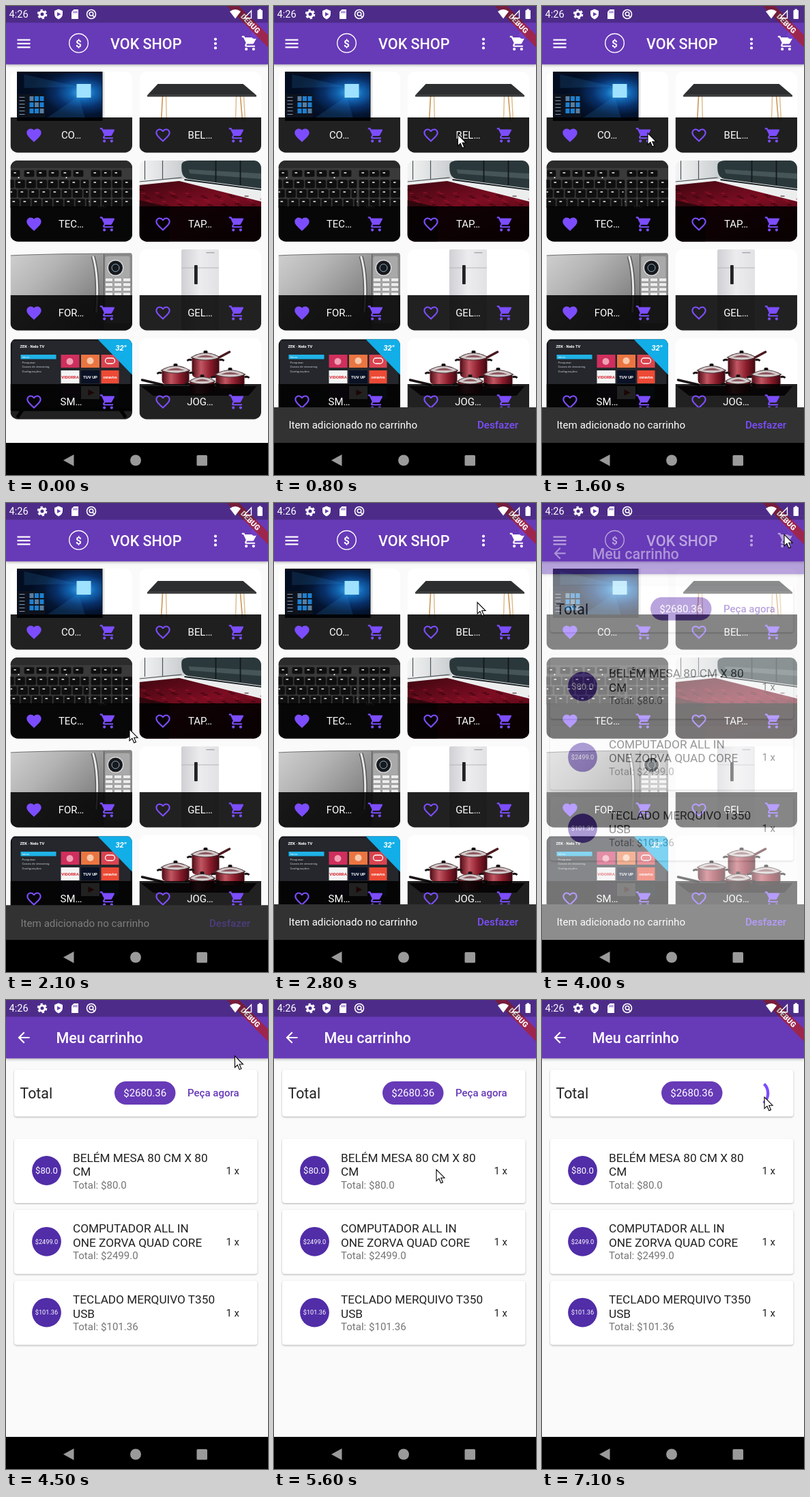
An HTML page for the animation above (7200 ms loop, 384 by 686 pixels).

```html
<!DOCTYPE html>
<html lang="pt">
<head>
<meta charset="utf-8">
<style>
  html, body { margin: 0; width: 100%; height: 100%; overflow: hidden; background: #fafafa; }
  svg { display: block; font-family: Roboto, sans-serif; }
  .bar { filter: drop-shadow(0 1.5px 2px rgba(0,0,0,.32)); }
  .card { filter: drop-shadow(0 1px 1.2px rgba(0,0,0,.3)); }
</style>
</head>
<body>
<svg id="stage" width="384" height="686" viewBox="0 0 384 686"></svg>
<script>
const PRIMARY = '#673ab7', ACCENT = '#7c4dff', INK = '#212121';
const LOOP = 7200;

const rect = (x, y, w, h, fill, r = 0, extra = '') =>
  `<rect x="${x}" y="${y}" width="${w}" height="${h}" fill="${fill}" rx="${r}" ${extra}/>`;
const circle = (x, y, r, fill, extra = '') => `<circle cx="${x}" cy="${y}" r="${r}" fill="${fill}" ${extra}/>`;
const path = (d, fill, extra = '') => `<path d="${d}" fill="${fill}" ${extra}/>`;
const line = (d, stroke, w = 1, extra = '') => path(d, 'none', `stroke="${stroke}" stroke-width="${w}" ${extra}`);
const text = (x, y, size, str, fill, extra = '') =>
  `<text x="${x}" y="${y}" font-size="${size}" fill="${fill}" ${extra}>${str}</text>`;
const group = (x, y, body, extra = '') => `<g transform="translate(${x} ${y})" ${extra}>${body}</g>`;
const repeat = (n, fn) => Array.from({ length: n }, (_, i) => fn(i)).join('');
const MID = ' text-anchor="middle" ', MEDIUM = ' font-weight="500" ', BOLD = ' font-weight="700" ';

// 24-unit icons, centred on x, y
const HEART = 'M12 21.35l-1.45-1.32C5.4 15.36 2 12.28 2 8.5 2 5.42 4.42 3 7.5 3c1.74 0 3.41.81 4.5 2.09C13.09 3.81 14.76 3 16.5 3 19.58 3 22 5.42 22 8.5c0 3.78-3.4 6.86-8.55 11.54z';
const HEART_HOLE = 'M12.1 18.55l-.1.1-.11-.1C7.14 14.24 4 11.39 4 8.5 4 6.5 5.5 5 7.5 5c1.54 0 3.04.99 3.57 2.36h1.87C13.46 5.99 14.96 5 16.5 5c2 0 3.5 1.5 3.5 3.5 0 2.89-3.14 5.74-7.9 10.05z';
const CART = 'M7 18a2 2 0 1 0 0 4 2 2 0 0 0 0-4zM1 2v2h2l3.6 7.59-1.35 2.45c-.16.28-.25.61-.25.96 0 1.1.9 2 2 2h12v-2H7.42c-.14 0-.25-.11-.25-.25l.03-.12.9-1.63h7.45c.75 0 1.41-.41 1.75-1.03l3.58-6.49c.08-.14.12-.31.12-.48 0-.55-.45-1-1-1H5.21l-.94-2zm16 16a2 2 0 1 0 0 4 2 2 0 0 0 0-4z';
const BACK = 'M20 11H7.83l5.59-5.59L12 4l-8 8 8 8 1.41-1.41L7.83 13H20z';
const icon = (x, y, d, fill) =>
  path(d, fill, `fill-rule="evenodd" transform="translate(${x - 12.8} ${y - 12.8}) scale(1.0667)"`);

const gradient = (id, stops, attrs = '', kind = 'linear') =>
  `<${kind}Gradient id="${id}" ${attrs}>${stops.map((c, i) =>
    `<stop offset="${i / (stops.length - 1)}" stop-color="${c}"/>`).join('')}</${kind}Gradient>`;

const defs = `<defs>
  <clipPath id="tile"><rect width="178.5" height="118.5" rx="10.7"/></clipPath>
  ${gradient('desktop', ['#3fb4f0', '#1263b0', '#08306a', '#041634', '#030d22'], 'cx=".77" cy=".42" r=".62"', 'radial')}
  ${gradient('steel', ['#cfcfcf', '#b4b4b4', '#8e8e8e', '#6c6c6c'], 'x2="1" y2=".6"')}
  ${gradient('fridge', ['#cfd0d4', '#ececee', '#e2e2e5'])}
  ${gradient('enamel', ['#4c0a14', '#c25662', '#8c1d2c', '#3e0810'])}
  ${gradient('rug', ['#3f0610', '#7d0d22', '#4a0713'], 'x2=".6" y2="1"')}
  ${gradient('room', ['#f4f4f4', '#c9cdcf'])}
</defs>`;

// Product pictures, in tile coordinates
const computer = () =>
  rect(9.5, 0, 128.5, 72, '#e4e6e8') + rect(9.5, 0, 125.5, 72, '#0a0e16') + rect(10.5, 1.5, 123.5, 70, 'url(#desktop)') +
  path('M100 22L20 4V24zM100 36L50 70H110z', '#3aa4ea', 'opacity=".14"') +
  rect(97, 18, 21, 20, '#9fe2ff') +
  rect(10.5, 33, 40, 34, '#0d131e') +
  repeat(9, i => rect(28 + i % 3 * 7.5, 36 + (i / 3 | 0) * 9, 6, 7, i % 4 ? '#1d7fd0' : '#5a7d9e')) +
  repeat(6, i => rect(13, 37 + i * 5, 8, 1, '#8793a3'));

const table = () =>
  rect(0, 68, 179, 51, '#eeeeee') +
  line('M34 36L32 72M148 36L151 72', '#d0a066', 1.8) +
  line('M39 36L40 72M142 36L141 72M153 36L155 72', '#dcb987', 1.4) +
  path('M27 18H152L171.5 34.5H11.5z', '#2d2e2f') + path('M11.5 34.5H171.5V36.5H11.5z', '#191a1a');

const key = (x, y, w, h) =>
  rect(x, y, w, h, '#0f0f0f', 2, 'stroke="#2a2a2a" stroke-width=".6"') +
  rect(x + 4, y + 3, w * .25, 2, '#b9b9b9');
const keyRow = (x, y, n, w, h, pitch) => repeat(n, i => key(x + i * pitch, y, w, h));
const keyboard = () =>
  rect(0, 0, 179, 119, '#3a3a3a') + rect(0, 0, 179, 11, '#2b2b2b') +
  keyRow(1, 14, 1, 13, 10, 0) + keyRow(20, 14, 5, 15, 10, 18) + keyRow(118, 14, 3, 14, 10, 15.5) +
  circle(12, 25, 1, '#fff') + circle(82, 25, 1, '#fff') +
  repeat(3, r => keyRow(-9 + r * 4, 28 + r * 14, 7, 14.5, 12.5, 16) +
    key(103 + r * 4, 28 + r * 14, 12 - r * 4, 12.5) + keyRow(118, 28 + r * 14, 4, 14, 12.5, 15.5)) +
  text(128, 69.5, 5, 'teclas', '#aaa');

const rug = () =>
  rect(0, 0, 179, 119, '#eceeee') + rect(0, 0, 66, 27, 'url(#room)') +
  line('M8 0V28M34 0V27M0 31L62 25', '#4d5356', 1.2) +
  path('M62 5Q64 0 74 0H179V41L72 27Q60 25 62 5z', '#2b383b') +
  path('M72 13L179 19V27L74 19z', '#465557') +
  line('M112 0V32M148 0V36M66 28L179 43', '#11181b', 1.8) +
  path('M0 36L58 30L179 60V119H0z', 'url(#rug)') +
  repeat(60, i => rect(i * 47 % 178, 42 + i * 29 % 26 + (i * 47 % 178) * .06, 6, 1.8, i % 2 ? '#a3162f' : '#2a0309', 0, 'opacity=".55"')) +
  path('M0 58L44 68V119H0z', '#1d0609', 'opacity=".75"');

const microwave = () =>
  rect(0, 0, 179, 119, '#fafafa') + path('M0 9Q60 6 179 6V119H0z', 'url(#steel)') +
  line('M0 9Q60 6 179 6', '#6f6f6f', 1.2) +
  rect(137, 7, 42, 112, '#8a8a8a') + line('M137 7V100', '#555', 1) +
  line('M121 10Q130 40 126 92', '#555', 6) + line('M121 10Q130 40 126 92', '#e8e8e8', 3) +
  rect(139, 10, 36, 98, '#a9a9a9', 3) + circle(154, 27, 12, '#d5d5d5') + circle(154, 27, 10.5, '#17191d') +
  circle(154, 27, 5.5, 'none', 'stroke="#8db0c4"') +
  repeat(12, i => rect(139 + i % 3 * 13, 42 + (i / 3 | 0) * 7, 11, 5, '#eee', 1, 'stroke="#777" stroke-width=".5"'));

const refrigerator = () =>
  rect(0, 0, 179, 119, '#fff') + rect(61.5, 0, 55, 119, 'url(#fridge)', 2) +
  line('M61.5 27H116.5', '#b5b6ba', 1) + rect(80.5, 23, 4.8, 28, '#202123', 1) +
  rect(98, 4, 12, 1.5, '#aaacb0');

const television = () =>
  rect(0, 0, 179, 119, '#fff') + line('M18 104L10 116M161 104L169 116', '#101114', 5) +
  rect(0, 1.5, 179, 105, '#131418', 2) + rect(2.5, 3.5, 173, 98, '#25272c') +
  text(14, 14, 5.8, 'ZEK · Nelo TV', '#fff', BOLD) +
  rect(15, 24, 52, 6.5, '#1fb2e6') + text(17, 29, 4.4, 'Início', '#fff') +
  ['Pesquisar', 'Canais de streaming', 'Configurações'].map((s, i) => text(17, 36.5 + i * 6.5, 4.4, s, '#c8ccd2')).join('') +
  rect(74, 24, 27, 19, '#cf2f5c') + rect(103.5, 24, 27, 19, '#ea7541') + rect(133, 24, 26, 19, '#d8444f') +
  circle(87, 34, 5, '#f0a0b5') + circle(117, 33, 5, '#f8c9ad') + rect(139, 29, 14, 8, 'none', 4, 'stroke="#fff" stroke-width="1.3"') +
  rect(74, 47, 27, 19, '#f4f4f4') + rect(103.5, 47, 27, 19, '#0a1226') + rect(133, 47, 26, 19, '#ec4a35') +
  text(87.5, 59, 6, 'VIDORRA', '#d71f2c', BOLD + MID) + text(117, 59, 6, 'TUV UP', '#fff', BOLD + MID) +
  text(146, 58.5, 5, 'cenaviva', '#fff', BOLD + MID) +
  rect(74, 70, 27, 19, '#3c2a52') + rect(103.5, 70, 27, 19, '#fff') + rect(133, 70, 26, 19, '#2a4a60') +
  path('M114 75L123 79.5L114 84z', '#d22') + path('M128 1.5H179V54z', '#12aee8') +
  text(154, 18, 11, '32"', '#fff', BOLD + 'font-style="italic"');

const pot = (x, y, w, h) =>
  line(`M${x - 7} ${y + 5}Q${x - 4} ${y + 2} ${x} ${y + 4}M${x + w} ${y + 4}Q${x + w + 4} ${y + 2} ${x + w + 7} ${y + 5}`, '#1b1517', 2.8) +
  path(`M${x} ${y}H${x + w}V${y + h - 7}Q${x + w} ${y + h} ${x + w - 9} ${y + h}H${x + 9}Q${x} ${y + h} ${x} ${y + h - 7}z`, 'url(#enamel)') +
  path(`M${x - 1} ${y}Q${x + w / 2} ${y - 13} ${x + w + 1} ${y}Q${x + w / 2} ${y + 8} ${x - 1} ${y}z`, '#d3c9ca', 'stroke="#4c3538" stroke-width="1.2"') +
  path(`M${x + 7} ${y}Q${x + w / 2} ${y - 7} ${x + w - 7} ${y}z`, '#8e5a61') +
  rect(x + w / 2 - 3, y - 10, 6, 4, '#1b1517', 1.5);
const cookware = () =>
  rect(0, 0, 179, 119, '#fff') + path('M2 70H172L160 84H20z', '#3a2a2c') +
  line('M4 61L34 68', '#1b1517', 3.5, 'stroke-linecap="round"') +
  pot(77, 28, 40, 30) + line('M117 28L132 20', '#4c1a20', 3.5, 'stroke-linecap="round"') +
  pot(33, 47, 40, 21) + pot(112, 53, 42, 20) + pot(74, 63, 36, 18);

const products = [
  [computer, 'CO…', true], [table, 'BEL…'], [keyboard, 'TEC…', true], [rug, 'TAP…'],
  [microwave, 'FOR…', true], [refrigerator, 'GEL…'], [television, 'SM…'], [cookware, 'JOG…'],
];
const tile = ([picture, label, liked], i) => group(6.5 + i % 2 * 189, 96 + (i >> 1) * 130,
  rect(0, 0, 178.5, 118.5, '#fff') + picture() + rect(0, 67, 178.5, 52, '#000', 0, 'opacity=".87"') +
  icon(34.5, 93, liked ? HEART : HEART + HEART_HOLE, ACCENT) +
  text(89, 98.3, 14.93, label, '#fff', MID) + icon(143, 93, CART, ACCENT), 'clip-path="url(#tile)"');

const appBar = body => rect(0, 0, 384, 85.4, PRIMARY, 0, 'class="bar"') + body;
const title = (x, str) => text(x, 63.3, 21.5, str, '#fff', MEDIUM);

const shopPage = rect(0, 0, 384, 640, '#fafafa') + products.map(tile).join('') + appBar(
  repeat(3, i => rect(16.5, 48.5 + i * 5.4, 19, 2.2, '#fff')) +
  circle(106.5, 54.3, 13.8, 'none', 'stroke="#fff" stroke-width="1.4"') +
  text(106.5, 59.8, 15.5, '$', '#fff', MID + BOLD) + title(153, 'VOK SHOP') +
  repeat(3, i => circle(307, 48.6 + i * 6.4, 2.1, '#fff')) +
  icon(357.5, 54.5, CART, '#fff') + circle(364.5, 42.5, 5.5, '#7040c8'));

const snackBar = rect(0, 587, 384, 56, '#323232') +
  `<g id="snackText">${text(21.5, 618.3, 15.15, 'Item adicionado no carrinho', '#fff')}
  ${text(298, 618.3, 15.1, 'Desfazer', ACCENT, MEDIUM)}</g>`;

const card = (y, h) => rect(12, y, 356.5, h, '#fff', 4, 'class="card"');
const items = [
  ['$80.0', 13.1, 'BELÉM MESA 80 CM X 80', 'CM'],
  ['$2499.0', 9.2, 'COMPUTADOR ALL IN', 'ONE ZORVA QUAD CORE'],
  ['$101.36', 9.2, 'TECLADO MERQUIVO T350', 'USB'],
];
const cartItem = ([price, size, first, second], i) => group(0, i * 103.8,
  card(203, 94) + circle(59.5, 249.5, 21.4, '#512da8') + text(59.5, 249.5 + size * .36, size, price, '#fff', MID) +
  text(98, 236.5, 17.2, first, INK) + text(98, 257, 17.2, second, INK) +
  text(98, 275.5, 15.05, 'Total: ' + price, '#757575') + text(322.5, 255, 14.93, '1 x', INK));

const cartPage = rect(0, 0, 384, 640, '#fafafa') + card(102, 68.5) +
  text(20.5, 144.3, 21.33, 'Total', INK) +
  `<g id="chip">${rect(159, 119, 89.5, 34, PRIMARY, 17)}${text(203.7, 141.3, 15, '$2680.36', '#fff', MID)}</g>` +
  text(266, 141.3, 15, 'Peça agora', PRIMARY, MEDIUM + ' id="order"') +
  line('', ACCENT, 4.27, 'id="spinner"') + items.map(cartItem).join('') +
  appBar(icon(26, 55, BACK, '#fff') + title(73.5, 'Meu carrinho'));

const banner = `<g transform="translate(384 0) rotate(45)">${rect(-43, 29.9, 86, 12.8, '#b71c1c', 0, 'opacity=".68"')}
  ${text(0, 40.2, 10.9, 'DEBUG', '#fff', MID + 'font-weight="900"')}</g>`;

const statusBar = rect(0, 0, 384, 24.5, '#000', 0, 'opacity=".25"') + text(4.5, 17.2, 14.6, '4:26', '#fff') +
  circle(53, 12, 4, 'none', 'stroke="#fff" stroke-width="3"') +
  circle(53, 12, 6.3, 'none', 'stroke="#fff" stroke-width="2" stroke-dasharray="3.3"') +
  path('M77 4.5L83 7V11.5Q83 17 77 19.5Q71 17 71 11.5V7z', '#fff') + path('M75 9L80.5 12L75 15z', PRIMARY) +
  path('M99.5 5H106V19H96V8.5z', '#fff') + line('M99.5 7.5V10.5M101.7 7.5V10.5M103.9 7.5V10.5', PRIMARY, 1.1) +
  circle(125, 12, 6.5, 'none', 'stroke="#fff" stroke-width="1.6"') +
  circle(125, 11.5, 2.8, 'none', 'stroke="#fff" stroke-width="1.6"') + line('M127 13.5L130 17', '#fff', 1.6) +
  path('M328 8Q336 2 344 8L336 18.5z', '#fff') +
  line('M349 17.7L359.5 7V17.7z', '#fff', 1.4) + rect(368.5, 6, 7.5, 13, '#fff', 1) + rect(370.5, 4.5, 3.5, 2, '#fff');

const navBar = rect(0, 639, 384, 47, '#000') + path('M84 664.5L99.5 656V673z', '#9a9a9a') +
  circle(190, 664.5, 8, '#9a9a9a') + rect(279.5, 657, 15.5, 15.5, '#9a9a9a', 1.5);

const pointer = path('M0 0V16.8L3.9 13.2L6.7 19.8L9.5 18.6L6.7 12.2H12z', '#fff', 'stroke="#000" stroke-width="1.1"');

document.getElementById('stage').innerHTML = defs + shopPage + `<g id="snack">${snackBar}</g>` +
  `<g id="cart">${cartPage}</g>` + banner + statusBar + navBar + `<g id="pointer">${pointer}</g>`;

const [snack, snackText, cart, chip, order, spinner, cursor] =
  ['snack', 'snackText', 'cart', 'chip', 'order', 'spinner', 'pointer'].map(id => document.getElementById(id));
const move = (el, x, y) => el.setAttribute('transform', `translate(${x} ${y})`);
const show = (el, on) => el.setAttribute('visibility', on ? 'visible' : 'hidden');
const clamp = v => Math.min(1, Math.max(0, v));

const bezier = (x1, y1, x2, y2) => x => {
  const at = (a, b, s) => 3 * (1 - s) * s * ((1 - s) * a + s * b) + s ** 3;
  let lo = 0, hi = 1;
  for (let i = 0; i < 20; i++) {
    const s = (lo + hi) / 2;
    if (at(x1, x2, s) < x) lo = s; else hi = s;
  }
  return at(y1, y2, lo);
};
const standard = bezier(.4, 0, .2, 1), easeIn = bezier(.42, 0, 1, 1);

// Pointer stops: time, x, y
const stops = [
  [100, 384, 330], [450, 345, 189], [650, 345, 189], [1000, 155, 186], [1650, 155, 186],
  [1950, 158, 318], [2100, 181, 331], [3200, 348, 66], [3500, 348, 66], [3750, 355, 46],
  [4150, 355, 46], [4800, 320, 110], [5500, 238, 248], [5800, 238, 248], [6600, 326, 142], [LOOP, 326, 142],
];
function movePointer(t) {
  show(cursor, t >= stops[0][0]);
  const i = Math.max(1, stops.findIndex(s => s[0] > t));
  const [t0, x0, y0] = stops[i - 1], [t1, x1, y1] = stops[i];
  const u = clamp((t - t0) / (t1 - t0)), k = u * u * (3 - 2 * u);
  move(cursor, x0 + (x1 - x0) * k, y0 + (y1 - y0) * k);
}

function moveSnack(t) {
  const ramp = start => clamp((t - start) / 250);
  const v = ramp(500) - ramp(1080) + ramp(1330) - ramp(2052) + ramp(2302);
  const closing = (t > 1080 && t < 1330) || (t > 2052 && t < 2302);
  const from = closing ? .72 : .45;
  move(snack, 0, 52 * (1 - standard(v)));
  show(snack, v > 0);
  snackText.setAttribute('opacity', standard(clamp((v - from) / (1 - from))));
}

function moveCart(t) {
  const u = clamp((t - 3815) / 300);
  cart.setAttribute('display', u > 0 ? 'inline' : 'none');
  cart.setAttribute('opacity', easeIn(u));
  move(cart, 0, 171 * (1 - standard(u)));
}

function moveSpinner(t) {
  const s = (t - 6955) / 1000, loading = s >= 0;
  spinner.setAttribute('display', loading ? 'inline' : 'none');
  order.setAttribute('display', loading ? 'none' : 'inline');
  move(chip, loading ? 16 : 0, 0);
  if (!loading) return;
  const start = -Math.PI / 2 + s * Math.PI * 1.7;
  const sweep = Math.max(.001, standard(clamp(s * 2)) * Math.PI * 1.5);
  const point = a => `${312 + 19.2 * Math.cos(a)} ${136.5 + 19.2 * Math.sin(a)}`;
  spinner.setAttribute('d', `M${point(start)}A19.2 19.2 0 ${+(sweep > Math.PI)} 1 ${point(start + sweep)}`);
}

const origin = performance.now();
function frame() {
  const t = (performance.now() - origin) % LOOP;
  movePointer(t);
  moveSnack(t);
  moveCart(t);
  moveSpinner(t);
  requestAnimationFrame(frame);
}
frame();
</script>
</body>
</html>
```
